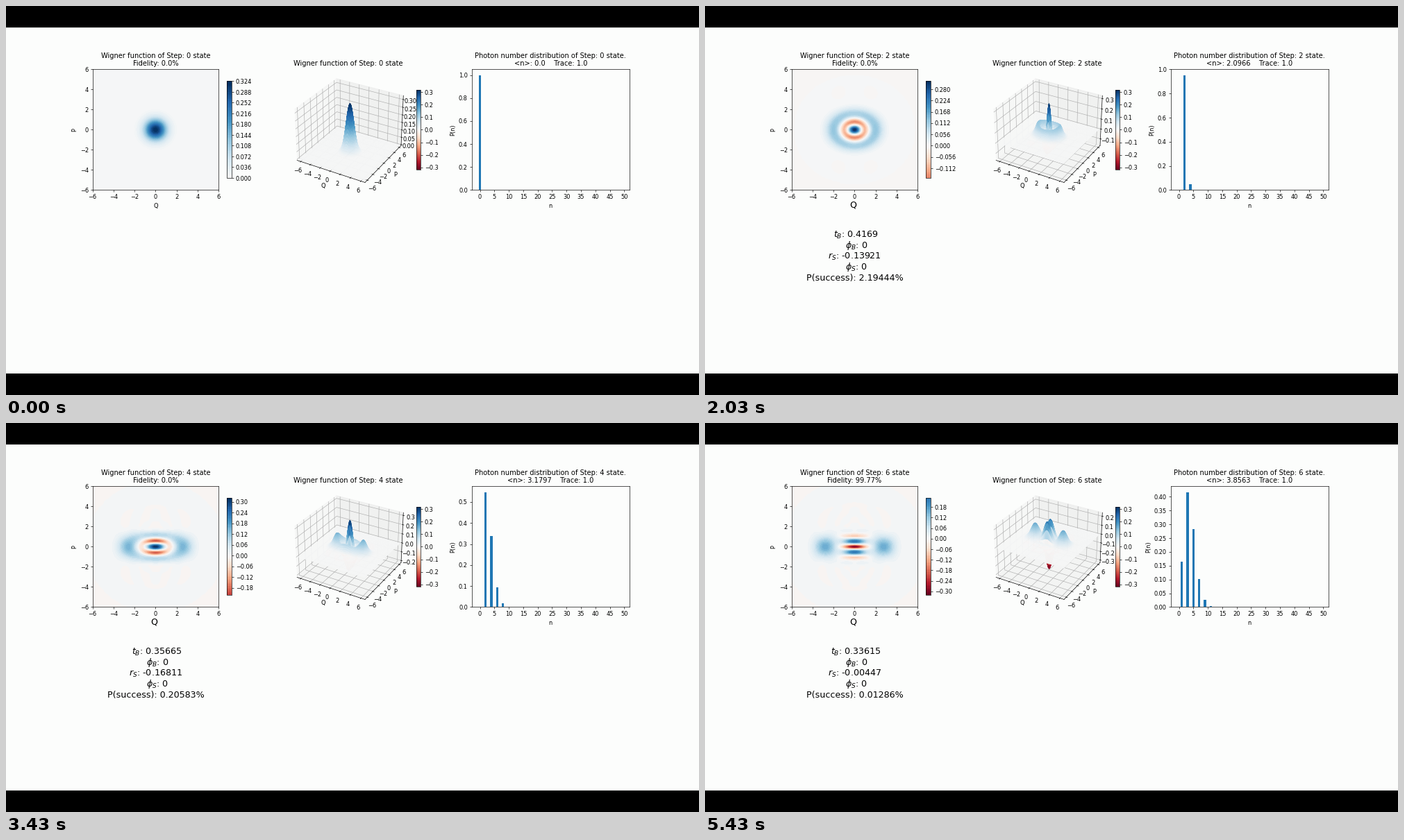
These frames come from a looping animation (998x561 px, 5460 ms). A matplotlib script:

```python
import matplotlib.pyplot as plt
import numpy as np
from matplotlib.animation import FuncAnimation
from matplotlib.colors import Normalize
from matplotlib.patches import Rectangle

W, H, DPI = 998, 561, 59
LOOP, TICK = 5460, 30
FIRST, HOLD = 630, 800      # ms: first change, then time per state
BAR = 31                    # letterbox height
PAPER = "#fcfdfc"
NORM = Normalize(-1 / np.pi, 1 / np.pi)
REACH = 6.5

# photon probabilities {n: P(n)}, fidelity, <n>, (t_B, r_S, P(success))
STATES = [
    ({0: 1}, "0.0", "0.0", None),
    ({1: .9997, 3: .0003}, "15.54", "1.0006",
     ("0.27465", "-0.01586", "7.54496")),
    ({2: .953, 4: .046, 6: .001}, "0.0", "2.0966",
     ("0.4169", "-0.13921", "2.19444")),
    ({1: .823, 3: .165, 5: .011, 7: .001}, "45.21", "1.3839",
     ("0.40792", "-0.15912", "0.77458")),
    ({2: .547, 4: .337, 6: .095, 8: .018, 10: .003}, "0.0", "3.1797",
     ("0.35665", "-0.16811", "0.20583")),
    ({1: .002, 3: .337, 5: .3855, 7: .19, 9: .064, 11: .017, 13: .004},
     "79.19", "5.087", ("0.45088", "-0.15986", "0.07729")),
    ({1: .165, 3: .417, 5: .284, 7: .103, 9: .026, 11: .005},
     "99.77", "3.8563", ("0.33615", "-0.00447", "0.01286")),
]

plt.rcParams["axes.facecolor"] = PAPER
fig = plt.figure(figsize=(W / DPI + 1e-5, H / DPI + 1e-5), dpi=DPI,
                 facecolor=PAPER)


def box(x0, y0, x1, y1):
    """Pixel corners, measured from the top left, as an axes rectangle."""
    return [x0 / W, 1 - y1 / H, (x1 - x0) / W, (y1 - y0) / H]


def label(x, y, text, size=15.4):
    fig.text(x / W, 1 - y / H, text, size=size, ha="center", va="baseline")


def psi(x, probs):
    """Wave function of a superposition of Fock states."""
    amps = {n: np.sqrt(p) for n, p in probs.items()}
    if min(probs.values()) == probs.get(1) and len(probs) > 1:
        amps[1] *= -1
    scale = np.sqrt(sum(probs.values()))
    last, cur = np.zeros_like(x), np.pi ** -.25 * np.exp(-x * x / 2)
    total = np.zeros_like(x)
    for n in range(max(probs) + 1):
        total += amps.get(n, 0) / scale * cur
        last, cur = cur, (np.sqrt(2 / (n + 1)) * x * cur
                          - np.sqrt(n / (n + 1)) * last)
    return total


def wigner(axis, probs):
    y = np.linspace(-7, 7, 281)
    pair = psi(axis[:, None] + y, probs) * psi(axis[:, None] - y, probs)
    wave = np.cos(2 * axis[:, None] * y)
    return np.round(wave @ pair.T * (y[1] - y[0]) / np.pi, 9)


def draw_map(axis, w, step, fidelity):
    ax = fig.add_axes(box(124.5, 91.3, 306.2, 265.5))
    fill = ax.contourf(axis, axis, w, 60, cmap="RdBu", norm=NORM)
    ax.set(xlim=(-6, 6), ylim=(-6, 6), ylabel="P",
           xlabel="" if step else "Q")
    ax.set_title(f"Wigner function of Step: {step} state\n"
                 f"Fidelity: {fidelity}%")
    fig.colorbar(fill, cax=fig.add_axes(box(318.2, 108.5, 325.2, 248)))


def draw_surface(axis, w, step):
    ax = fig.add_axes(box(406, 91.3, 580.2, 265.5), projection="3d")
    x, y = np.meshgrid(axis, axis)
    surf = ax.plot_surface(x, y, w, rstride=1, cstride=1,
                           cmap="RdBu", norm=NORM)
    # thin edges in the face colour close the seams
    surf.set_edgecolor(surf.to_rgba(surf.get_array()))
    surf.set_linewidth(.4)
    side = REACH * 25 / 24
    pad = np.ptp(w) / 48
    ax.set(xlim=(-side, side), ylim=(-side, side),
           zlim=(w.min() - pad, w.max() + pad))
    ax.set_xlabel("Q", labelpad=-2.5)
    ax.set_ylabel("P", labelpad=-2.5)
    ax.tick_params(length=0, pad=0)
    ax.set_title(f"Wigner function of Step: {step} state")
    fig.colorbar(surf, cax=fig.add_axes(box(591.3, 121, 597, 236)),
                 ticks=np.arange(-3, 4) / 10)


def draw_bars(probs, step, mean):
    ax = fig.add_axes(box(670.5, 91.3, 898.2, 265.5))
    ax.bar(range(50), [probs.get(n, 0) for n in range(50)], color="#1f77b4")
    ax.set_xticks(range(0, 51, 5))
    ax.set(xlim=(-2.89, 51.89), ylim=(0, 1.05 * max(probs.values())),
           xlabel="n", ylabel="P(n)")
    ax.set_title(f"Photon number distribution of Step: {step} state.\n"
                 f"<n>: {mean}    Trace: 1.0")


def draw_params(t, r, success):
    label(213.6, 290, "Q")
    lines = [(217.8, f"$t_B$: {t}"), (217.8, r"$\phi_B$: 0"),
             (215.8, f"$r_S$: {r}"), (217.8, r"$\phi_S$: 0"),
             (215.7, f"P(success): {success}%")]
    for i, (x, text) in enumerate(lines):
        label(x, 333.5 + 15.55 * i, text)


def render(step):
    """Draw one state and return it as an image."""
    probs, fidelity, mean, params = STATES[step]
    fig.clear()
    for y in (0, H - BAR):
        x0, y0, w, h = box(0, y, W, y + BAR)
        fig.add_artist(Rectangle((x0, y0), w, h, color="black", lw=0))
    axis = np.linspace(-REACH, REACH, 131)
    field = wigner(axis, probs)
    draw_map(axis, field, step, fidelity)
    draw_surface(axis, field, step)
    draw_bars(probs, step, mean)
    if params:
        draw_params(*params)
    fig.canvas.draw()
    return np.array(fig.canvas.buffer_rgba())


# each state holds still, so it is rendered once and then only swapped
shots = [render(k) for k in range(len(STATES))]
fig.clear()
screen = fig.figimage(shots[0], origin="upper")


def update(i):
    t = i * TICK
    step = 0 if t < FIRST else 1 + (t - FIRST) // HOLD
    screen.set_data(shots[min(step, len(shots) - 1)])
    return [screen]


anim = FuncAnimation(fig, update, frames=LOOP // TICK, interval=TICK,
                     repeat=True, repeat_delay=0)
plt.show()
```
